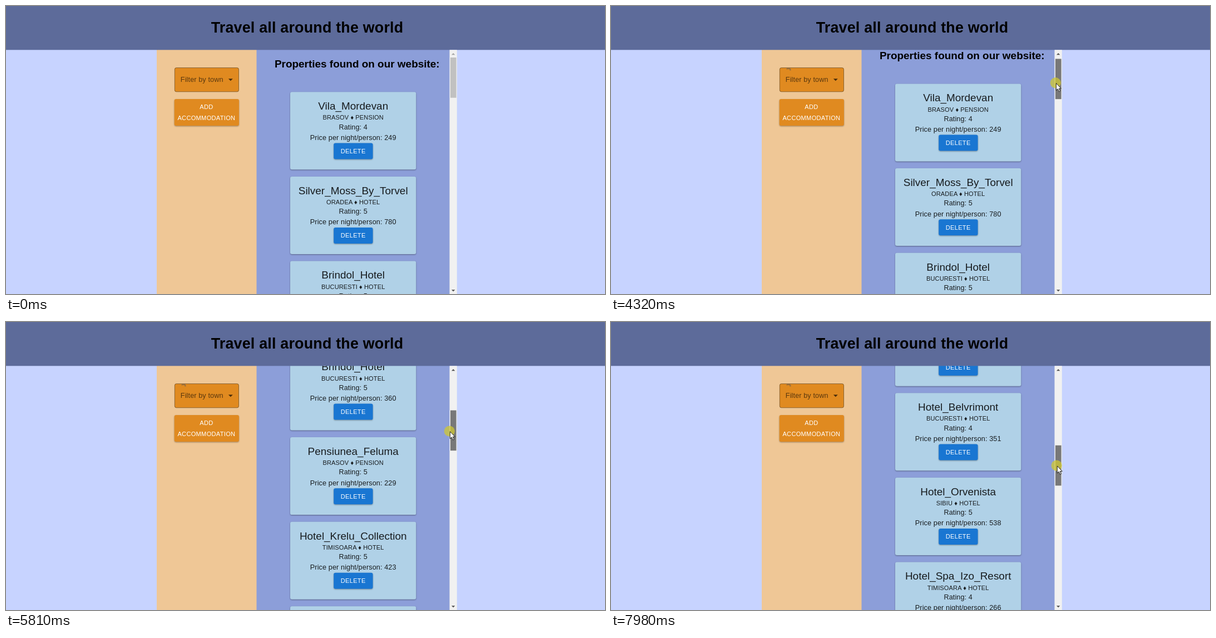
These frames come from a looping animation (1077 px wide and 520 px high, 8000 ms). An HTML page:

```html
<!DOCTYPE html>
<html lang="en">
<head>
<meta charset="utf-8">
<title>Travel all around the world</title>
<style>
  html, body { margin: 0; width: 100%; height: 100%; overflow: hidden; background: #c7d3ff; }
  svg { display: block; width: 100%; height: 100%; font-family: "Liberation Sans", Arial, sans-serif; }
  text { text-anchor: middle; fill: rgba(0, 0, 0, .87); }
  .h1 { font-size: 26.86px; font-weight: bold; letter-spacing: .00735em; fill: #000; }
  .h2 { font-size: 18.96px; font-weight: bold; fill: #000; }
  .name { font-size: 18.96px; }
  .kind { font-size: 11.06px; letter-spacing: .01071em; }
  .info { font-size: 12.64px; letter-spacing: .00938em; }
  .btn { font-size: 11.06px; letter-spacing: .02857em; fill: #fff; }
  .card { fill: #b0d1e7; filter: drop-shadow(0 1px .8px rgba(0, 0, 0, .38)); }
  .raised { filter: drop-shadow(0 1.3px 1.2px rgba(0, 0, 0, .35)); }
</style>
</head>
<body>
<svg viewBox="0 0 1077 520" preserveAspectRatio="none">
  <defs>
    <clipPath id="view"><rect x="450.5" y="79" width="347" height="441"/></clipPath>
  </defs>
  <rect width="1077" height="520" fill="#c7d3ff"/>
  <rect x="271" y="79" width="180" height="441" fill="#efc796"/>
  <rect x="450.5" y="79" width="347.5" height="441" fill="#8c9ed9"/>

  <g clip-path="url(#view)"><g id="list">
    <text class="h2" x="631.3" y="110.8">Properties found on our website:</text>
  </g></g>

  <rect width="1077" height="79.3" fill="#5d6b9a"/>
  <text class="h1" x="541.5" y="47.8">Travel all around the world</text>

  <rect x="303.3" y="111.5" width="115.2" height="43.3" rx="3" fill="#e08a20" stroke="#000" stroke-opacity=".4"/>
  <text class="info" x="352.2" y="137.2" style="fill:rgba(0,0,0,.6)">Filter by town</text>
  <path d="M399.8 131.3h8l-4 4z" fill="rgba(0,0,0,.68)"/>
  <path id="smudge" d="M315 114.5l1.5-3h5l2 2.5v2.5h-2l-1-2.5z" fill="#8d6a42" opacity=".8"/>
  <rect class="raised" x="302.7" y="168" width="116.2" height="48.3" rx="3.2" fill="#e08a20"/>
  <text class="btn" x="360.4" y="186.4">ADD</text>
  <text class="btn" x="360.4" y="206.2">ACCOMMODATION</text>

  <rect x="797.5" y="79.3" width="13.3" height="441" fill="#f1f1f1"/>
  <path id="up" d="M801 88.3h6.4l-3.2-3.4z"/>
  <path d="M801 512.2h6.4l-3.2 3.4z" fill="#505050"/>
  <rect id="thumb" x="799" width="10.6" height="72.7"/>

  <g id="pointer">
    <circle id="press" cx="-1.1" cy="-.8" r="9.6" fill="#cfc634" opacity=".76"/>
    <path d="M0 0V12.9L3 10.2 5 15.1 7.2 14.2 5.2 9.5H9Z" fill="#fff" stroke="#111" stroke-width=".9"/>
  </g>
</svg>
<script>
const LOOP = 8000, TICK = 70, PITCH = 152.6;
const APPEAR = 660, GRAB = 4320;
const $ = id => document.getElementById(id);

const stays = [
  "Vila_Mordevan, BRASOV ♦ PENSION, 4, 249",
  "Silver_Moss_By_Torvel, ORADEA ♦ HOTEL, 5, 780",
  "Brindol_Hotel, BUCURESTI ♦ HOTEL, 5, 360",
  "Pensiunea_Feluma, BRASOV ♦ PENSION, 5, 229",
  "Hotel_Krelu_Collection, TIMISOARA ♦ HOTEL, 5, 423",
  "Hotel_Belvrimont, BUCURESTI ♦ HOTEL, 4, 351",
  "Hotel_Orvenista, SIBIU ♦ HOTEL, 5, 538",
  "Hotel_Spa_Izo_Resort, TIMISOARA ♦ HOTEL, 4, 266"
];

function label(cls, y, str) {
  return `<text class="${cls}" x="624.2" y="${y}">${str}</text>`;
}

function card(stay, i) {
  const [name, kind, rating, price] = stay.split(", ");
  return `<g transform="translate(0 ${i * PITCH})">
    <rect class="card" x="511" y="155.3" width="226.3" height="140" rx="3.2"/>
    ${label("name", 187.2, name)}
    ${label("kind", 205.4, kind)}
    ${label("info", 222.7, "Rating: " + rating)}
    ${label("info", 241.8, "Price per night/person: " + price)}
    <rect class="raised" x="589.2" y="247.4" width="70.4" height="29" rx="3.2" fill="#1976d2"/>
    ${label("btn", 265.8, "DELETE")}
  </g>`;
}
$("list").innerHTML += stays.map(card).join("");

// Pointer stops and scroll stops, each reached between two times
const glides = [
  { from: APPEAR, to: 1060, at: [713, 355] },
  { from: 1200, to: 1540, at: [288, 131] },
  { from: 2060, to: 2270, at: [455, 83] },
  { from: 2340, to: 2620, at: [637, 97] },
  { from: 2880, to: 3240, at: [746, 115] },
  { from: 3510, to: 4240, at: [800, 137] }
];
const drags = [
  { from: GRAB, to: 4580, at: [174] },
  { from: 5040, to: 5810, at: [405] },
  { from: 6800, to: 7220, at: [665] },
  { from: 7550, to: 7980, at: [790] }
];

// Linear travel through the stops in whole ticks; the first tick falls on "from"
function follow(stops, start, t) {
  let pos = start;
  for (const { from, to, at } of stops) {
    if (t < from) break;
    const ticks = Math.floor((t - from) / TICK) + 1;
    const p = t >= to ? 1 : Math.min(1, ticks * TICK / (to - from + TICK));
    pos = pos.map((v, i) => v + (at[i] - v) * p);
  }
  return pos;
}

// While dragging, the hand settles on the thumb and drifts sideways in a shallow bow
function grip(scroll, thumbY) {
  return [798.3 + ((scroll - 340) / 225) ** 2, thumbY + 37 + 7.5 * Math.exp(-scroll / 230)];
}

function show(id, on) {
  $(id).setAttribute("visibility", on ? "visible" : "hidden");
}

function draw(t) {
  const held = t >= GRAB;
  const scroll = Math.max(0, follow(drags, [-28], t)[0]);
  const thumbY = 93 + scroll * .1642;
  const [x, y] = held ? grip(scroll, thumbY) : follow(glides, [990, 505], t);

  $("list").setAttribute("transform", `translate(0 ${-scroll})`);
  $("thumb").setAttribute("y", thumbY);
  $("thumb").setAttribute("fill", held ? "#787878" : x > 798 && t > 3510 ? "#a8a8a8" : "#c1c1c1");
  $("up").setAttribute("fill", scroll ? "#505050" : "#a3a3a3");
  $("pointer").setAttribute("transform", `translate(${x} ${y})`);
  show("pointer", t >= APPEAR);
  $("press").setAttribute("display", held ? "inline" : "none");
  show("smudge", t >= 2130);
}

const start = performance.now();
function tick() {
  draw((performance.now() - start) % LOOP);
  requestAnimationFrame(tick);
}
draw(0);
requestAnimationFrame(tick);
</script>
</body>
</html>
```
